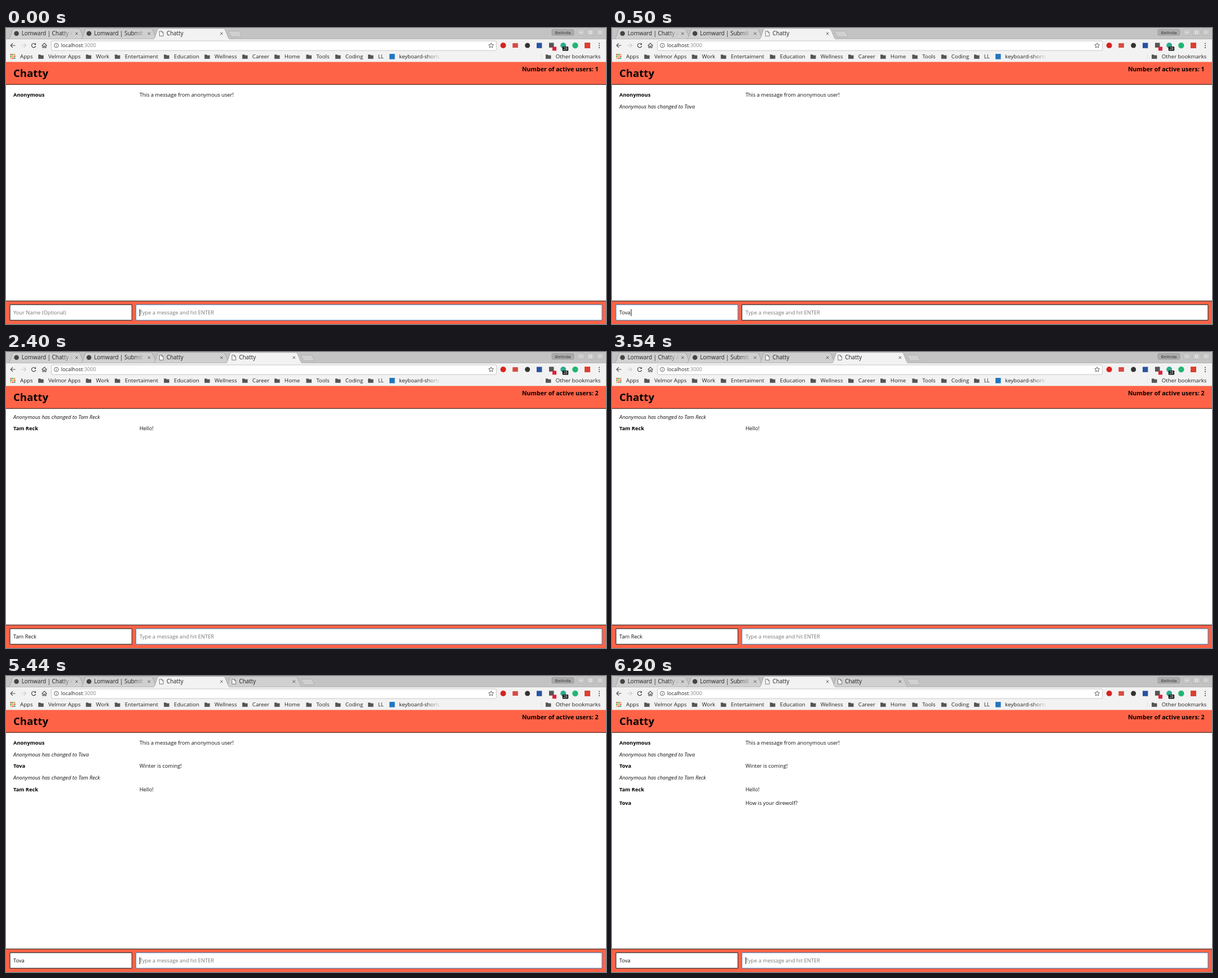
Write an HTML page that moves like this. It is 1064x526 px and loops after 8000 ms.

```html
<!DOCTYPE html>
<html lang="en">
<head>
<meta charset="utf-8">
<title>Chatty</title>
<style>
html, body { margin: 0; width: 100%; height: 100%; overflow: hidden; background: #fff; }
svg { display: block; width: 100%; height: 100%; }
text { font-family: "Open Sans", "Noto Sans", sans-serif; white-space: pre; }
</style>
</head>
<body>
<svg id="stage" viewBox="0 0 1064 526"></svg>
<script>
const stage = document.getElementById('stage');
const TAB_STEP = 128.5;
const PERIOD = 8000;

const text = (x, y, s, size = 9.3, fill = '#111', extra = '') =>
  `<text x="${x}" y="${y}" font-size="${size}" fill="${fill}" ${extra}>${s}</text>`;
const rect = (x, y, w, h, fill, extra = '') =>
  `<rect x="${x}" y="${y}" width="${w}" height="${h}" fill="${fill}" ${extra}/>`;
const dot = (x, y, r, fill) => `<circle cx="${x}" cy="${y}" r="${r}" fill="${fill}"/>`;
const line = (d, color = '#4a4a4a', width = 1.2, fill = 'none') =>
  `<path d="${d}" fill="${fill}" stroke="${color}" stroke-width="${width}"/>`;
const fade = (id, x1, x2) =>
  `<linearGradient id="${id}" gradientUnits="userSpaceOnUse" x1="${x1}" x2="${x2}" y1="0" y2="0">
    <stop stop-color="#222"/><stop offset="1" stop-color="#222" stop-opacity="0"/></linearGradient>`;

const BOLD = 'font-weight="700"', ITALIC = 'font-style="italic"';
const USER_A = 'Tova', USER_B = 'Tam Reck';

// Chat rows: [baseline, author, message]; a row without a message is a notice.
const notice = (y, name) => [y, `Anonymous has changed to ${name}`];
const first = [122.2, 'Anonymous', 'This a message from anonymous user!'];
const renamed = notice(142.8, USER_A);
const talk = [first, renamed, [163.4, USER_A, 'Winter is coming!'],
  notice(184, USER_B), [204.7, USER_B, 'Hello!']];

const states = [
  { at: 0, tabs: 3, active: 2, users: 1, name: '', focus: 'message', caret: true, rows: [first] },
  { at: 500, tabs: 3, active: 2, users: 1, name: USER_A, focus: 'name', caret: true, rows: [first, renamed] },
  { at: 2400, tabs: 4, active: 3, users: 2, name: USER_B, focus: 'message', caret: false,
    rows: [notice(118.8, USER_B), [139.4, USER_B, 'Hello!']] },
  { at: 4300, tabs: 4, active: 2, users: 2, name: USER_A, focus: 'message', caret: true, rows: talk },
  { at: 6200, tabs: 4, active: 2, users: 2, name: USER_A, focus: 'message', caret: true,
    rows: [...talk, [228.5, USER_A, 'How is your direwolf?']] }
];

const tabTitles = ['Lomward | Chatty App', 'Lomward | Submit Project', 'Chatty', 'Chatty'];

function tabShape(i, active) {
  const x = i * TAB_STEP;
  return line(`M${x + 4} 20 Q${x + 6} 19 ${x + 7} 16.5 L${x + 11.5} 3 Q${x + 12.3} 0.8 ${x + 15} 0.8
    H${x + 128} Q${x + 130.5} 0.8 ${x + 131.5} 3 L${x + 137} 16.5 Q${x + 138} 19 ${x + 140} 20`,
    '#a3a3a3', 0.9, active ? '#f2f2f2' : '#d0d0d0');
}

function tabLabel(i) {
  const x = i * TAB_STEP, c = x + 125.2;
  const icon = i < 2 ? dot(x + 18.6, 9.8, 4.3, '#444')
    : line(`M${x + 15.3} 5.5 h4 l2.6 2.6 v6.2 h-6.6 z M${x + 19.3} 5.5 v2.6 h2.6`, '#666', 0.9, '#fff');
  return icon + text(x + 27.7, 13.3, tabTitles[i], 9.9, i < 2 ? `url(#tab${i})` : '#222') +
    line(`M${c - 2.2} 7.7 l4.4 4.4 m0 -4.4 l-4.4 4.4`, '#555', 1);
}

function tabStrip({ tabs, active }) {
  const order = [...Array(tabs).keys()];
  const n = 395 + (tabs - 3) * TAB_STEP;
  return rect(0, 0, 1064, 20, '#c3c3c3') +
    order.filter(i => i !== active).map(i => tabShape(i)).join('') +
    line('M0 19.7 H1064', '#ababab', 0.8) + tabShape(active, true) + order.map(tabLabel).join('') +
    line(`M${n} 5.5 h17 q2 0 2.6 1.5 l3 7 q.6 1.7 -1 1.7 h-15 q-2 0 -2.7 -1.7 l-4 -7 q-.7 -1.5 .1 -1.5z`,
      '#aaa', 0.8, '#d0d0d0') +
    rect(968, 2.5, 39, 10.5, '#aaa', 'rx="2" stroke="#999" stroke-width=".8"') +
    text(987.5, 10.7, 'Belinda', 8, '#333', 'text-anchor="middle"') +
    [1013, 1030, 1047].map(x => rect(x, 2, 13, 11, '#c9c9c9', 'rx="2" stroke="#b2b2b2" stroke-width=".8"')).join('') +
    line('M1017 8 h5 M1034.5 6 h4 v4 h-4z M1051.2 5.3 l4.4 4.4 m0 -4.4 l-4.4 4.4', '#eee', 1);
}

function toolbar() {
  return rect(0, 20, 1064, 40.5, '#f2f2f2') +
    line('M16.5 31 H8.5 M12 27.2 L8.2 31 L12 34.8') +
    line('M27 31 H35 M31.5 27.2 L35.3 31 L31.5 34.8', '#ccc') +
    line('M52 28.6 A3.7 3.7 0 1 0 52.7 32') + line('M53 26.4 V30 H49.5z', 'none', 0, '#4a4a4a') +
    line('M63.5 31.3 L68 27 L72.5 31.3 M65 30.5 V35 H67 V32 H69 V35 H71 V30.5', '#4a4a4a', 1.1) +
    rect(80.5, 23, 789, 17, '#fff', 'rx="2" stroke="#c2c2c2" stroke-width=".9"') +
    line('M85.4 31 a3.8 3.8 0 1 0 7.6 0 a3.8 3.8 0 1 0 -7.6 0 M89.2 30.5 v2.7 M89.2 28.6 v1', '#555', 0.9) +
    text(97.7, 34.3, 'localhost<tspan fill="#858585">:3000</tspan>', 9.2, '#222') +
    line('M860.3 26.6 l1.3 2.9 3.1 .3 -2.4 2.1 .7 3.1 -2.7 -1.6 -2.7 1.6 .7 -3.1 -2.4 -2.1 3.1 -.3z', '#555', 0.9) +
    dot(881.7, 31, 5, '#d8231f') + rect(898.3, 27, 9.6, 8, '#d94a43') + dot(924.7, 31, 4.5, '#333') +
    rect(941, 26.4, 9.4, 9.4, '#2853a0') + rect(963, 26.3, 8.5, 8.5, '#555') + rect(969, 33.3, 7, 7, '#e0203c') +
    dot(988.2, 31, 5, '#2bab8d') + rect(986.8, 33, 10.4, 7.5, '#111', 'rx="1"') +
    text(992, 39.4, '28', 6.5, '#fff', 'text-anchor="middle"') +
    dot(1009.4, 31, 5.2, '#23b574') + rect(1026, 26, 10, 10, '#dc4030') +
    [27.5, 31.2, 34.9].map(y => dot(1052, y, 1.05, '#555')).join('');
}

function bookmarks() {
  const items = [[75, 'Velmor Apps'], [159.5, 'Work'], [210.7, 'Entertaiment'], [297.8, 'Education'],
    [369.8, 'Wellness'], [436.8, 'Career'], [493.8, 'Home'], [550.2, 'Tools'], [601.7, 'Coding'],
    [659.8, 'LL'], [974.8, 'Other bookmarks']];
  const label = (x, s, fill = '#222') => text(x, 53.7, s, 9.7, fill);
  const folder = x => line(`M${x} 47.2 h3.7 l1.2 1.2 h4.6 v6.3 h-9.5z`, 'none', 0, '#555');
  const colors = ['#d9453c', '#3d9b59', '#e2a52b'];
  let out = label(25, 'Apps');
  for (let i = 0; i < 9; i++)
    out += rect(7.6 + i % 3 * 3.3, 46 + (i / 3 | 0) * 3.3, 2.3, 2.3, colors[(i + (i / 3 | 0)) % 3]);
  for (const [x, s] of items) out += folder(x - 17.8) + label(x, s);
  return out + rect(680, 46, 9.5, 9.5, '#2277be') + label(697, 'keyboard-shortcuts', 'url(#mark)') +
    line('M949.5 45 V56', '#ddd', 0.8);
}

function field(x, w, focused) {
  return rect(x, 491.6, w, 27.8, '#fff', `rx="1" stroke="${focused ? '#557fac' : '#333'}" stroke-width="1.2"`);
}

function page({ users, rows, name, focus, caret }) {
  const chat = rows.map(([y, who, message]) => message
    ? text(13, y, who, 9.3, '#000', BOLD) + text(236.7, y, message)
    : text(13, y, who, 9.3, '#111', ITALIC)).join('');
  const caretX = focus === 'name' ? 34 : 237.2;
  return rect(0, 60.5, 1064, 465.5, '#fff') +
    rect(0, 60.3, 1064, 40, '#ff6347') + rect(0, 99.8, 1064, 1.2, '#4b302b') +
    text(13, 87, 'Chatty', 18.6, '#000', BOLD) +
    text(1050.6, 76.7, `Number of active users: ${users}`, 10.65, '#000', `${BOLD} text-anchor="end"`) + chat +
    rect(0, 485, 1064, 41, '#ff6347') + rect(0, 484.5, 1064, 1.3, '#4b302b') +
    field(7, 216.3, focus === 'name') + field(230.3, 826.7, focus === 'message') +
    text(13, 509.1, name || 'Your Name (Optional)', 9.3, name ? '#111' : '#777') +
    text(236.7, 509.1, 'Type a message and hit ENTER', 9.3, '#777') +
    (caret ? rect(caretX - 0.5, 499.5, 1, 12.5, '#111') : '');
}

let shown;
function draw() {
  const t = performance.now() % PERIOD;
  const state = states.findLast(s => t >= s.at);
  if (state !== shown) {
    shown = state;
    stage.innerHTML = `<defs>${fade('tab0', 98, 119)}${fade('tab1', 226, 247)}${fade('mark', 745, 771)}</defs>` +
      tabStrip(state) + toolbar() + bookmarks() + page(state);
  }
  requestAnimationFrame(draw);
}
draw();
</script>
</body>
</html>
```
